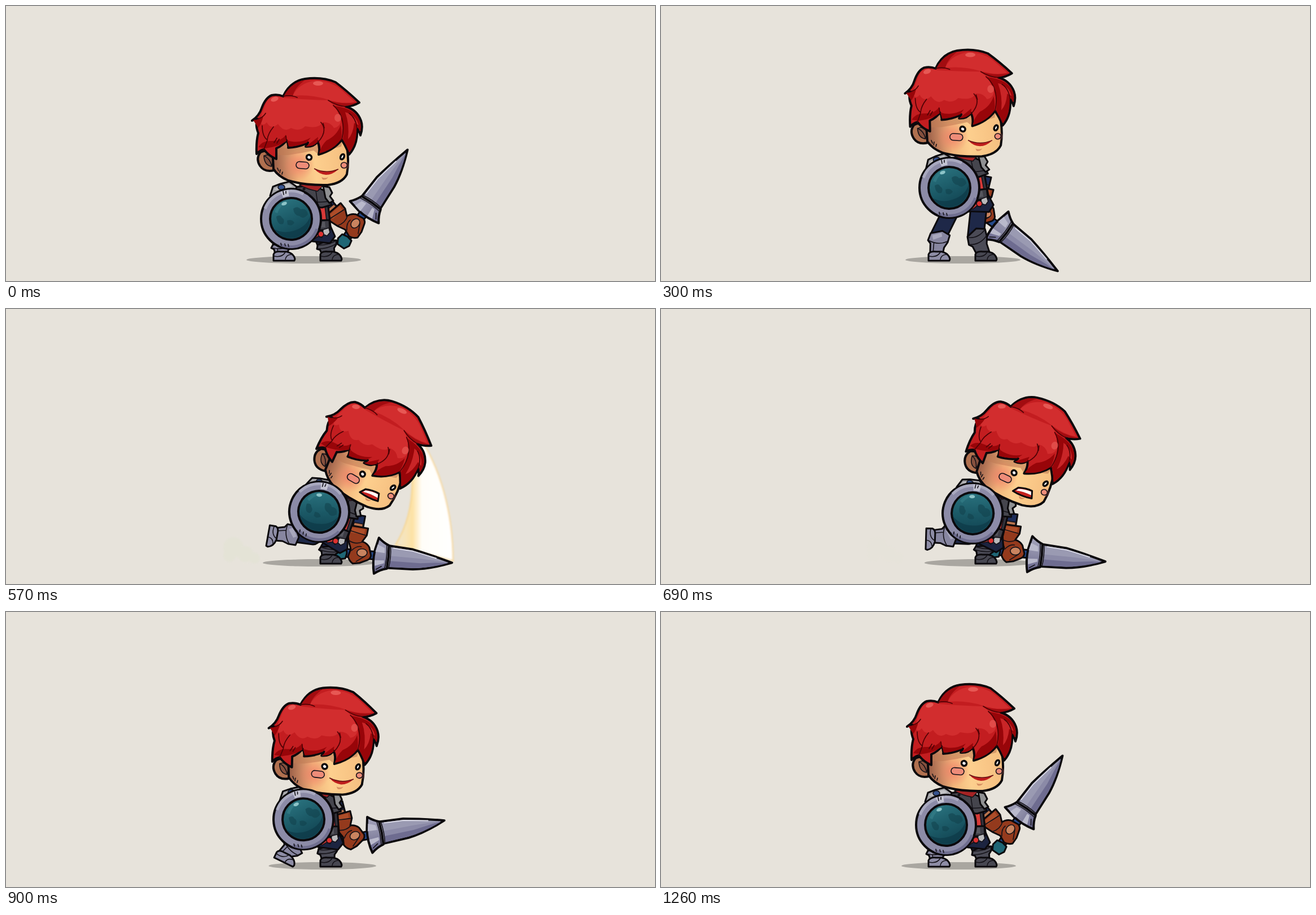
Recreate the animation shown at these times as an HTML page. Size 1150 px wide and 487 px high, loop 1290 ms.

```html
<!DOCTYPE html>
<html lang="en">
<head>
<meta charset="utf-8">
<title>Knight slash</title>
<style>
html, body { margin: 0; height: 100%; overflow: hidden; background: #e7e3db; }
svg { display: block; width: 100vw; height: 100vh; }
.o { stroke: #0b090c; stroke-width: 4; stroke-linejoin: round; }
.m { stroke: #0b090c; stroke-width: 3; stroke-linejoin: round; }
.n { stroke: #141218; stroke-width: 1.6; stroke-linejoin: round; stroke-linecap: round; }
.l { fill: none; }
path { vector-effect: non-scaling-stroke; }
</style>
</head>
<body>
<svg viewBox="0 0 1150 487" preserveAspectRatio="none">
<defs>
  <linearGradient id="skin" gradientUnits="userSpaceOnUse" x1="470" x2="600" y1="280" y2="272">
    <stop offset="0" stop-color="#925843"/><stop offset=".2" stop-color="#c98762"/>
    <stop offset=".36" stop-color="#f1b67b"/><stop offset=".6" stop-color="#fdcf8e"/><stop offset="1" stop-color="#f6c081"/>
  </linearGradient>
  <radialGradient id="blush"><stop offset="0" stop-color="#f27766" stop-opacity=".75"/><stop offset="1" stop-color="#f27766" stop-opacity="0"/></radialGradient>
  <linearGradient id="glow" gradientUnits="userSpaceOnUse" x1="696" x2="793" y1="0" y2="0">
    <stop offset="0" stop-color="#fce6b4" stop-opacity=".5"/><stop offset=".25" stop-color="#fde2a4"/>
    <stop offset=".42" stop-color="#fffdf8"/><stop offset="1" stop-color="#fff"/>
  </linearGradient>
  <linearGradient id="orb" x1=".3" x2=".75" y1="0" y2="1">
    <stop offset="0" stop-color="#2b7480"/><stop offset=".5" stop-color="#1b5966"/><stop offset="1" stop-color="#10404e"/>
  </linearGradient>
  <linearGradient id="steel" x1="0" x2="0" y1="0" y2="1">
    <stop offset="0" stop-color="#a5a5bc"/><stop offset=".5" stop-color="#8c8ba6"/><stop offset="1" stop-color="#64628a"/>
  </linearGradient>
  <filter id="soft"><feGaussianBlur stdDeviation="1.6"/></filter>
  <path id="foot" d="M-13 13L-13 2Q-11-4 0-3L10-3Q23 0 25 10L24 13Z"/>
  <path id="shin" d="M-10 2L-12-16L-17-21L-14-34L6-41L20-35L18-22L13-12L12 2Z"/>
</defs>

<ellipse id="shadow" cy="449.5" ry="6.5" fill="#a9a6a0"/>
<g id="dust" fill="#e2e3d3" filter="url(#soft)">
  <circle cx="403" cy="422" r="18"/><circle cx="424" cy="434" r="14"/><circle cx="440" cy="441" r="10"/><circle cx="396" cy="437" r="11"/>
</g>
<path id="trail" fill="url(#glow)" stroke="#f8d48a" stroke-width="2" filter="url(#soft)"/>

<g id="sword">
  <path class="m" fill="#244a8c" d="M-22-7H30V7H-22Z"/>
  <path class="m" fill="#1f6675" d="M-42-7L-33-12L-23-10L-21 0L-23 10L-33 12L-42 7Z"/>
  <path class="o" fill="#9a9ab2" d="M46-20L95-17Q126-11 166 0Q128 15 98 18L46 20Z"/>
  <path fill="#6e6c90" d="M56 3L110 4L160 1Q128 13 98 16L56 18Z"/>
  <path fill="#8b8aa7" d="M56-2L110-2L160 0L110 6L56 7Z"/>
  <path class="l" stroke="#d5d5e2" stroke-width="2" d="M60-16L95-14Q115-10 138-5"/>
  <path class="o" fill="url(#steel)" d="M33-32L28-10Q25 12 30 32Q40 24 52 21L53 0L52-20Q42-24 33-32Z"/>
  <path fill="#b9b9cb" d="M32-20L45-15L46-6L29-7ZM29 8L46 7L46 12L30 18Z"/>
  <path class="n l" d="M48-20Q51 0 48 21M55-19Q58 0 55 20M33 24L42 18"/>
</g>
<g id="glove">
  <path class="m" fill="#1d2c58" d="M560 352L574 340L588 357L574 370Z"/>
  <path class="n" fill="#b8744f" d="M570 362L582 352L592 362L578 374Z"/>
  <path class="m" fill="#943a1d" d="M568 372L594 350L602 360L605 373Q613 368 621 370L634 377Q638 382 636 387L631 401L624 411Q616 413 609 409L602 397L589 391L572 380Z"/>
  <path fill="#ad4d29" d="M574 371L592 355L597 362L580 378Z"/>
  <path class="n l" d="M576 377L601 361M588 390Q602 386 606 373M605 398Q604 385 611 380M628 386L625 404"/>
  <ellipse class="n" cx="620" cy="386" rx="9" ry="7" fill="#c98460" transform="rotate(-50 620 386)"/>
</g>

<path id="thighR" class="l" stroke-linecap="round"/><path id="thighRf" class="l" stroke-linecap="round"/>
<g id="shinR"><use href="#shin" class="m" fill="#4b4b56"/><path class="n l" d="M-16-21Q2-14 18-24M-13-32Q3-25 19-34"/></g>
<g transform="translate(570 438)"><use href="#foot" class="m" fill="#474751"/><path class="n l" d="M-12 5Q2 8 8-2M8 11Q9 3 18 2"/></g>
<path id="thighL" class="l" stroke-linecap="round"/><path id="thighLf" class="l" stroke-linecap="round"/>
<g id="shinL"><use href="#shin" class="m" fill="#8786a0"/><path fill="#a9a8bd" d="M-11-31L5-37L7-31L-8-23Z"/><path class="n l" d="M-16-21Q2-14 18-24M-6-18L-5 0"/></g>
<g id="footL"><use href="#foot" class="m" fill="#8e8da6"/><path class="n l" d="M-12 5Q2 8 8-2M8 11Q9 3 18 2"/></g>

<g id="torso">
  <path class="m" fill="#1c2440" d="M505 390L575 390L583 408L574 420L545 417L505 412Z"/>
  <path class="m" fill="#33323a" d="M503 322L543 317L568 329L575 390L508 395Z"/>
  <path class="n" fill="#d83a38" d="M530 354L565 354L568 380L530 382ZM534 397L560 396L560 410L553 408L546 413L536 408Z"/>
  <path class="n l" d="M549 356L550 380"/>
  <path class="m" fill="#3d3d45" d="M530 380L573 379L574 396L532 399Z"/>
  <path fill="#57575f" d="M547 383L565 382L566 392L548 393Z"/>
  <path class="n" fill="#b9b9bb" d="M562 396L572 393L574 401L569 407L561 404Z"/>
  <circle class="n" cx="558" cy="404" r="5" fill="#dc3130"/>
  <path class="m" fill="#45454d" d="M503 322L543 317L568 329L577 352L560 357L540 355L508 352Z"/>
  <path class="n l" d="M548 320L553 355M508 344Q535 350 574 346"/>
  <g fill="#17161b"><circle cx="520" cy="326" r="2.5"/><circle cx="528" cy="324" r="2.5"/><circle cx="525" cy="332" r="2.5"/><circle cx="518" cy="335" r="2.5"/></g>
  <path class="n" fill="#a52324" d="M520 317Q545 310 562 318L552 328Q535 325 520 317Z"/>
  <path class="m" fill="#8f9092" d="M562 319L573 321L578 331L574 337L580 345L573 349L566 340Z"/>
  <path class="m" fill="#a3a3a7" d="M468 336L473 320L486 315L502 311L515 320L512 331L494 338L478 346Z"/>
  <path fill="#c5c5c7" d="M474 325L489 318L501 315L508 319L488 326Z"/>
  <ellipse class="n" cx="488" cy="321" rx="6" ry="4.5" fill="#37548f"/>
</g>

<g id="head">
  <path class="o" fill="#b0704f" d="M474 262Q462 253 451 259Q442 270 450 283Q458 295 475 291Z"/>
  <path class="n" fill="#85503e" d="M471 267Q463 261 457 266Q458 282 470 284Q475 276 471 267Z"/>
  <path class="n l" d="M457 265Q468 270 471 284"/>
  <path class="o" fill="url(#skin)" d="M472 250L474 289Q483 302 500 309Q530 318 570 317Q596 314 604 298Q609 270 602 240L560 225L480 235Z"/>
  <path fill="#c07c55" opacity=".6" d="M480 252L500 251L530 247L554 240L554 263L545 256L525 260L500 264L482 264ZM578 253L596 240L594 249Z"/>
  <circle cx="519" cy="282" r="27" fill="url(#blush)"/><circle cx="600" cy="282" r="9" fill="url(#blush)"/>
  <rect class="n" x="514" y="276" width="23" height="12" rx="6" fill="#ee8c79" transform="rotate(5 525 282)"/>
  <ellipse class="n" cx="599" cy="282" rx="5.5" ry="5" fill="#ee8c79"/>
  <g fill="#fff" stroke="#09080a" stroke-width="3.6">
    <ellipse cx="537" cy="268" rx="4.6" ry="4.2" transform="rotate(35 537 268)"/>
    <ellipse cx="596" cy="267" rx="3" ry="4.8" transform="rotate(25 596 267)"/>
  </g>
  <path class="n l" d="M481 287L483 292M486 290L485 295M490 294L489 298"/>
  <path fill="#d58e62" d="M559 303Q565 306 571 303Q567 309 561 307Z"/>
  <g id="smile"><path fill="#bf1d1d" d="M547 289Q567 297 588 290Q578 299 567 299Q555 298 547 289Z"/><path class="l" stroke="#641012" stroke-width="1.6" d="M546 288Q567 298 589 289"/></g>
  <g id="shout"><path class="m" fill="#c5211f" d="M546 299L553 290Q566 286 578 287L582 300Q564 303 546 299Z"/><path fill="#fff" d="M554 292Q566 288 577 289L579 295Q564 293 551 296Z"/></g>

  <path class="o" fill="#c31d20" d="M436 203Q449 194 453 181Q460 162 471 158Q482 156 491 160Q504 133 530 129Q560 125 584 135Q604 150 626 171Q614 178 602 178Q622 184 629 203Q633 215 628 229Q626 221 622 217Q624 245 608 263Q603 250 595 237Q580 256 554 263Q557 250 552 240Q545 250 531 249L535 242Q520 250 500 251Q501 244 497 238Q491 247 479 252L479 271Q466 266 457 254Q449 256 444 262Q443 240 447 225Q441 210 446 200Q442 200 436 203Z"/>
  <path fill="#d22d2e" d="M457 182Q462 164 472 161Q482 159 495 163Q530 166 570 167Q586 178 594 196Q595 213 581 216Q574 204 560 206Q556 218 530 213Q520 223 505 216Q493 225 482 209Q469 220 462 206Q455 214 451 206Q452 190 457 182Z"/>
  <path fill="#d22d2e" d="M508 159Q518 137 548 132Q578 133 596 150L618 170Q596 174 571 166Q540 156 508 159Z"/>
  <path fill="#a20c10" d="M492 160Q505 135 530 131Q511 145 508 160ZM571 167Q594 175 621 171Q610 177 600 177Q585 176 571 167Z"/>
  <path fill="#980509" d="M582 177Q620 182 627 204Q630 215 627 222L621 210Q623 243 608 259Q604 248 597 236Q601 205 582 177ZM555 261Q558 248 568 238Q586 230 593 211Q596 225 594 236Q580 255 555 261ZM531 249L553 232L552 241Q545 249 531 249ZM447 250Q454 238 470 239Q488 240 496 228L497 239Q484 249 460 252ZM498 238Q520 245 540 233L533 242Q515 249 501 249ZM438 202Q450 202 456 194Q454 206 447 216Z"/>
  <path fill="#c92527" d="M607 190Q621 196 625 211L617 207Q615 227 606 236Q609 210 601 188Z"/>
  <path class="l" stroke="#4f0205" stroke-width="1.7" stroke-linecap="round" d="M558 206Q571 221 553 241M580 176Q604 197 595 237M491 160Q505 157 516 162M571 167Q586 177 602 178M454 212Q454 231 463 237Q464 226 474 214M446 200Q455 198 460 190M608 190Q620 198 622 217M480 234L475 242M484 236L480 243M497 238L496 230M562 208L564 216M457 254L463 238"/>
  <g fill="#e75854"><ellipse cx="553" cy="137" rx="9" ry="4"/><ellipse cx="476" cy="165" rx="7" ry="4" transform="rotate(-20 476 165)"/><ellipse cx="588" cy="198" rx="6" ry="7" opacity=".7"/></g>
</g>

<g id="shield">
  <circle class="o" r="53" fill="#8c8ba7"/>
  <path class="l" stroke="#a9a9bf" stroke-width="5" d="M-46-18A49 49 0 0 1 22-44"/>
  <path class="l" stroke="#c4c4d3" stroke-width="11" d="M-16-43A46 46 0 0 1-4-46"/>
  <path class="l" stroke="#706f90" stroke-width="5" d="M46 18A49 49 0 0 1-20 45"/>
  <path class="n l" d="M-14-49L-13-43M-9-49L-9-45M-18 43L-17 47M-11 44L-10 48M-5 45L-4 49"/>
  <circle class="o" r="37" fill="url(#orb)"/>
  <path fill="#0e3a48" opacity=".7" d="M34-5A35 35 0 0 1-30 18Q-14 27 5 21Q28 14 34-5Z"/>
  <path fill="#11404c" opacity=".55" d="M4-18Q11-24 17-17Q28-20 30-8Q22 2 15-5Q5-6 4-18ZM-26-4Q-19-9-16-2Q-10 1-14 9Q-24 12-26-4ZM-7 3Q2 0 6 7Q1 14-6 10Z"/>
  <path fill="#347d87" opacity=".7" d="M-29-12Q-23-31-3-33Q-20-24-24-10Z"/>
  <ellipse cx="-12" cy="-27" rx="5" ry="3" fill="#8dc4c8" transform="rotate(-20 -12 -27)"/>
</g>
</svg>

<script>
const LOOP = 1290, STEP = 30;
const TIMES = [0, 120, 300, 390, 450, 510, 570, 630, 810, 1020, 1260];
const POSES = {
  // dx, dy, turn
  head: [[0,0,0],[16,6.5,4.8],[-1.5,-50,-1.1],[-6,-60,-4],[10,-50,-2],[50,-10,14],[75.6,17,25],[77,18,25],[52,11,4.4],[0,0,0],[0,0,0]],
  torso: [[0,0,0],[2,6,10],[6,-54,-4],[4,-60,-8],[8,-48,0],[18,-14,16],[26,7,25],[27,8,25],[24,1,5],[2,0,0],[0,0,0]],
  // x, y, turn
  shield: [[505,377,0],[490,387,38],[511,322,0],[505,312,-8],[512,325,0],[540,348,16],[555,359,24],[556,360,24],[536,366,13],[517,369,-18],[505,377,0]],
  // x, y, glove turn, sword angle
  hand: [[617,391,0,-55.3],[617,405,17,-37.7],[570,370,53,36.8],[625,320,-40,-30],[610,245,-95,-100],[655,320,-20,-40],[625,434,50,5.3],[626,435,50,6],[611,414,40,2.5],[618,389,6,-35.4],[617,391,0,-55.3]],
  // dx, dy, foot turn, shin turn, shin length
  legL: [[0,0,0,0,.45],[0,0,0,0,.3],[0,0,0,8,1],[0,0,0,10,1.05],[0,0,0,25,1],[-6,-20,55,65,1],[-9,-40,100,90,1],[-9,-40,100,90,1],[9,-20,55,78,.9],[0,0,0,8,.5],[0,0,0,0,.45]],
  // shin turn, shin length
  legR: [[-12,.55],[0,.6],[-22,1.1],[-24,1.15],[-15,1],[5,.7],[8,.45],[8,.45],[0,.55],[-12,.6],[-12,.55]],
  // centre, half width
  shadow: [[527.5,101.5],[529.5,101.5],[535,102],[538,102],[542,102],[548,101],[555,100],[559,99],[570.5,93.5],[541,99],[527.5,101.5]]
};
const $ = id => document.getElementById(id);
const set = (id, name, value) => $(id).setAttribute(name, value);
const move = (id, x, y, turn, tail = '') => set(id, 'transform', `translate(${x} ${y}) rotate(${turn}) ${tail}`);

// Monotone cubic through the key poses
function pose(part, t) {
  const rows = POSES[part], last = TIMES.length - 1;
  t = Math.min(t, TIMES[last]);
  let i = 0;
  while (i < last - 1 && t >= TIMES[i + 1]) i++;
  const h = TIMES[i + 1] - TIMES[i], u = (t - TIMES[i]) / h;
  return rows[i].map((a, j) => {
    const rate = k => (rows[k + 1][j] - rows[k][j]) / (TIMES[k + 1] - TIMES[k]);
    const slope = k => {
      if (k === 0 || k === last) return 0;
      const p = rate(k - 1), q = rate(k);
      return p * q <= 0 ? 0 : 2 * p * q / (p + q);
    };
    const b = rows[i + 1][j], v = 1 - u;
    return a * (1 + 2 * u) * v * v + b * u * u * (3 - 2 * u) + h * u * v * (v * slope(i) - u * slope(i + 1));
  });
}

function leg(side, x, y, turn, len, hipX, hipY) {
  move('shin' + side, x, y, turn, `scale(1 ${len})`);
  const r = turn * Math.PI / 180, k = 30 * len;
  const d = `M${hipX} ${hipY}L${x + k * Math.sin(r)} ${y - k * Math.cos(r)}`;
  [['', 31, '#0b090c'], ['f', 25, '#1e2848']].forEach(([s, w, c]) => {
    const id = 'thigh' + side + s;
    set(id, 'd', d); set(id, 'stroke-width', w); set(id, 'stroke', c);
  });
}

function slash(t) {
  const on = t >= 510 && t <= 600;
  set('trail', 'opacity', on ? (t > 570 ? .5 : 1) : 0);
  if (!on) return;
  const start = 1.05 - (t - 570) / 30 * .45, end = Math.max(0, (570 - t) / 100);
  const pts = [];
  for (let i = 0; i <= 20; i++) {
    const a = start + (end - start) * i / 20;
    pts.push([605 + 187 * Math.cos(a), 446 - 300 * Math.sin(a)]);
  }
  const lift = 150 * end;
  set('trail', 'd', `M${pts.join('L')}L690 ${418 - lift}Q745 ${330 - lift} ${pts[0]}Z`);
}

function draw(t) {
  const [hx, hy, hr] = pose('head', t), [bx, by, br] = pose('torso', t);
  move('head', 530 + hx, 315 + hy, hr, 'translate(-530 -315)');
  move('torso', 558 + bx, 404 + by, br, 'translate(-558 -404)');
  move('shield', ...pose('shield', t));
  const [x, y, glove, sword] = pose('hand', t);
  move('glove', x, y, glove, 'translate(-618 -392)');
  move('sword', x, y, sword);

  const [lx, ly, foot, shin, len] = pose('legL', t);
  move('footL', 487 + lx, 438 + ly, foot);
  leg('L', 487 + lx, 438 + ly, shin, len, 518 + bx, 396 + by);
  leg('R', 570, 438, ...pose('legR', t), 558 + bx, 402 + by);

  const [cx, rx] = pose('shadow', t);
  set('shadow', 'cx', cx); set('shadow', 'rx', rx);
  const shout = t >= 400 && t < 900;
  set('shout', 'opacity', +shout); set('smile', 'opacity', +!shout);

  const u = (t - 480) / 240;
  set('dust', 'opacity', u > 0 && u < 1 ? .9 * (1 - u) : 0);
  set('dust', 'transform', `translate(${(.375 - u) * 40} 0)`);
  slash(t);
}

function tick(now) {
  draw(Math.floor(now % LOOP / STEP) * STEP);
  requestAnimationFrame(tick);
}
requestAnimationFrame(tick);
</script>
</body>
</html>
```
